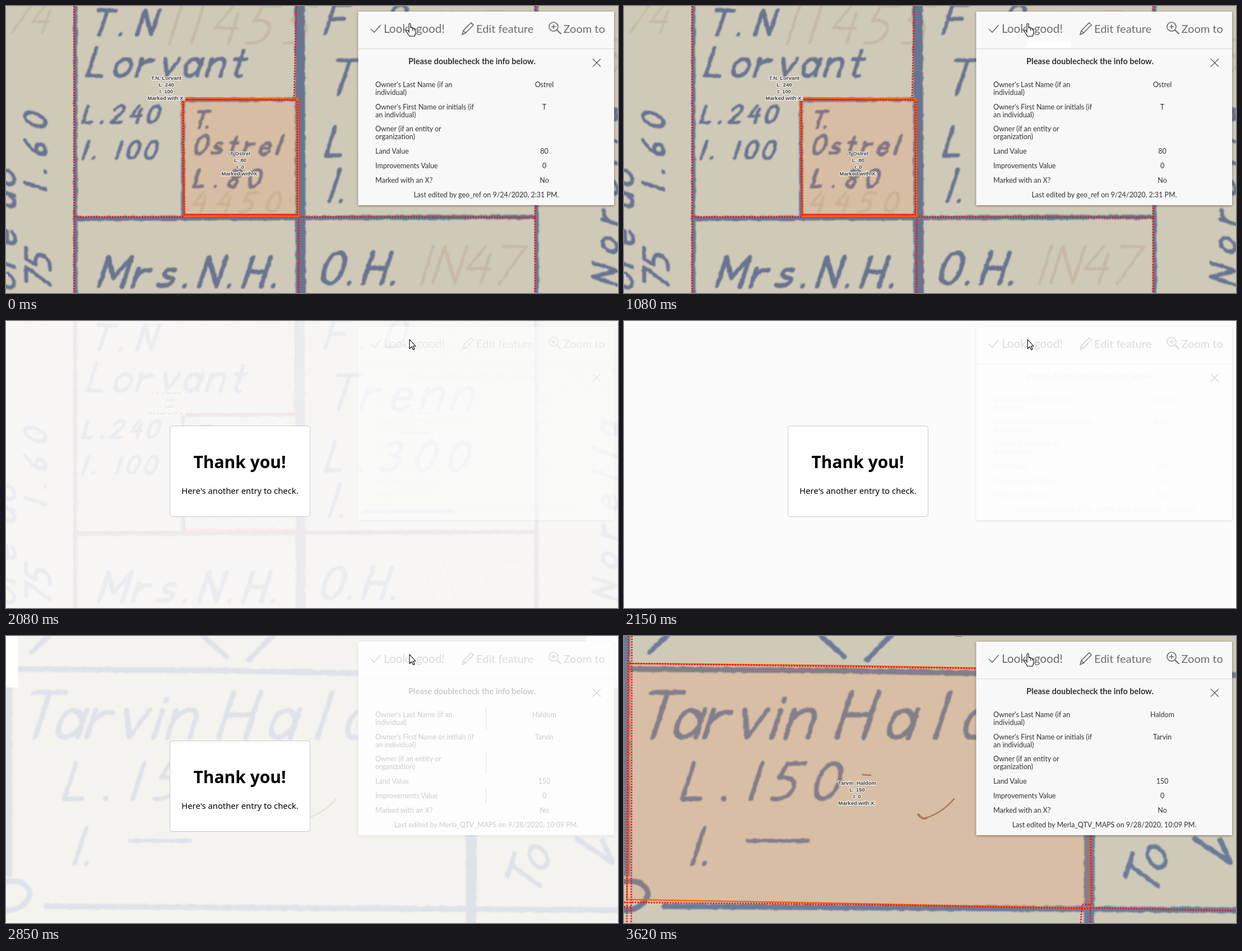
Animation, 1092 px wide and 513 px high, one loop 8 s. Source, as an HTML page:

```html
<!DOCTYPE html>
<html lang="en">
<head>
<meta charset="utf-8">
<title>Parcel check</title>
<style>
  html, body { margin: 0; width: 100%; height: 100%; overflow: hidden; background: #f0f0f0; }
  svg { display: block; width: 100vw; height: 100vh; }
  .pen { fill: none; stroke-linecap: round; stroke-linejoin: round; }
  .ui { font-family: Lato, "Open Sans", sans-serif; font-size: 12.5px; fill: #323232; }
  .act { font-size: 20px; fill: #6e6e6e; }
  .icon { fill: none; stroke: #6a6a6a; stroke-width: 1.6; }
  .mid { text-anchor: middle; }
  .tag { font: bold 9.5px "Liberation Sans", Arial, sans-serif; fill: #444; text-anchor: middle;
         stroke: #f4f2ee; stroke-width: 2.4; stroke-linejoin: round; paint-order: stroke; }
  .dots { fill: none; stroke: #f0141c; stroke-width: 2.8; stroke-dasharray: 2.6 2.2; }
  .dlg { font-family: "Noto Sans", "Open Sans", sans-serif; text-anchor: middle; fill: #000; }
</style>
</head>
<body>
<svg id="stage" viewBox="0 0 1092 513" preserveAspectRatio="none"></svg>
<script>
// Single-stroke handwriting on a 10-unit line: top 0, baseline 10.
const caps = {
  T: 'M0 0H7M3.5 0V10', N: 'M0 10V0L6 10V0', L: 'M0 0V10H5', H: 'M0 0V10M6 0V10M0 5H6',
  F: 'M6 0H0V10M0 5H5', M: 'M0 10V0L4 7 8 0V10', O: 'M3 0C-1 0-1 10 3 10S7 0 3 0',
  2: 'M0 2C1-1 6-1 5 3L0 10H6', 3: 'M0 1C5-2 6 4 2 4.5C7 4 6 12 0 9.5', 4: 'M3 0L0 6H6M5 2V10',
  5: 'M6 0H1L0 4C7 3 6 11 0 10', 6: 'M4 0C-2 5-1 10 2.5 10S5 4 0 6', 7: 'M0 0H6L2 10',
  8: 'M5 1C0-2-1 3 3 5S4 11 2 10-1 7 3 5 6 2 5 1'
};
const bowl = 'M5 7C4 3 0 3 0 7S4 11 5 7';
const small = {
  a: bowl + 'M5 4V10', d: bowl + 'M5 0V10', o: 'M2.5 4C-1 4-1 10 2.5 10S6 4 2.5 4',
  e: 'M0 7H4.5C5 3 0 3 0 7S3 11 5 9', n: 'M0 4V10V7C1 3 5 3 5 6V10', r: 'M0 4V10V7Q1 4 4 4.5',
  v: 'M0 4L2.5 10 5 4', t: 'M2 1V9Q2 10 4 10M0 4H4', l: 'M1 0V10', i: 'M1 4V10M1 1.5v.3',
  s: 'M4 4.5C0 3 0 7 3 7S4 11 0 9.5', '.': 'M.5 9.8v.2'
};
const glyphs = { ...caps, ...small, 0: caps.O, 1: small.l, ' ': '' };
const advance = c => '1il. '.includes(c) ? 3 : c === 'M' ? 9 : small[c] ? 6 : 7;

function write(str, x, y, h, gap, width = 6, rot = 0) {
  let pos = 0;
  const strokes = [...str].map(c => {
    const p = `<path d="${glyphs[c]}" transform="translate(${pos} 0)"/>`;
    pos += advance(c) + gap;
    return p;
  }).join('');
  return `<g stroke-width="${width * 10 / h}" transform="translate(${x} ${y}) rotate(${rot}) skewX(-18) ` +
    `scale(${h / 10}) translate(0 -10)">${strokes}</g>`;
}

const text = (str, x, y, cls = 'ui', more = '') => `<text x="${x}" y="${y}" class="${cls}" ${more}>${str}</text>`;
const line = (d, width, more = '') => `<path d="${d}" stroke-width="${width}" ${more}/>`;
const dots = d => `<path class="dots" d="${d}"/>`;
const rect = (x, y, w, h, more) => `<rect x="${x}" y="${y}" width="${w}" height="${h}" ${more}/>`;
const group = (id, body, more = '') => `<g id="${id}" ${more}>${body}</g>`;
const tag = (x, y, ...rows) => [...rows, 'Marked with X:'].map((r, i) => text(r, x, y + 12 * i, 'tag')).join('');
const paper = rect(0, 0, 1092, 513, 'fill="#cfc9b8"');
const ink = (color, body) => `<g class="pen" stroke="${color}" filter="url(#rough)">${body}</g>`;
const pencil = body => `<g class="pen" stroke="#a98f6c" opacity=".27" filter="url(#rough)">${body}</g>`;
const parcel = d => `<path d="${d}" fill="rgb(255,130,65)" fill-opacity=".16" stroke="#ff6408" stroke-width="2.6"/>`;

const defs = `<defs>
  <filter id="rough" filterUnits="userSpaceOnUse" x="-20" y="-20" width="1140" height="560" color-interpolation-filters="sRGB">
    <feTurbulence type="fractalNoise" baseFrequency=".09" numOctaves="2" seed="4" result="n"/>
    <feDisplacementMap in="SourceGraphic" in2="n" scale="4" xChannelSelector="R" yChannelSelector="G"/>
    <feGaussianBlur stdDeviation=".8"/>
  </filter>
  <filter id="shade" x="-5%" y="-5%" width="110%" height="110%">
    <feDropShadow dx="0" dy="1" stdDeviation="2" flood-opacity=".45"/>
  </filter></defs>`;

const firstMap = paper +
  pencil(write('11455', 285, 66, 66, 3, 5) + write('1N47', 735, 496, 66, 1, 5) + write('4450', 330, 368, 34, 6, 5) +
    write('74', 0, 48, 50, 1, 4) + write('145', 990, 125, 65, 0, 4) + write('1145', 750, 72, 62, 0, 3)) +
  ink('#69748f',
    line('M124 0V513M947 0V513', 7) + line('M524 0L526 513', 18) + line('M123 380L525 379 946 377', 8) +
    line('M316 168L524 167M316 168V377', 7) +
    write('T.N', 152, 51, 43, 4.5, 7) + write('Lorvant', 145, 125, 50, 2.3, 7) +
    write('L.240', 137, 208, 29, 3.8) + write('1. 100', 135, 272, 30, 3.6) +
    write('T.', 335, 217, 28, 1) + write('Ostrel', 335, 264, 32, 2.9) + write('L.80', 335, 323, 30, 5) +
    write('Mrs.N.H.', 166, 501, 52, 2.6, 8) + write('O.H.', 560, 496, 55, 2, 8) +
    write('F.O', 570, 48, 50, 5.5, 7) + write('Trenn', 573, 157, 60, 3, 7) + write('L.300', 571, 267, 50, 4.8, 7) +
    write('1.', 572, 349, 56, 1, 7) + line('M640 340L797 341', 7) +
    write('1.60', 70, 331, 36, 6, 7, -90) + write('ore ao', 15, 506, 44, 3, 7, -90) +
    write('75', 78, 506, 42, 1.5, 7, -90) + write('Norella', 1090, 498, 42, 6.4, 7, -90)) +
  dots('M121.5 0V513M518 0L514 165M522 165V513M944 0V513M122 377H524L946 378M316 167H516M315 168L318 375M319 373H517') +
  tag(733.5, 166.5, 'F.O Trenn', 'L: 300', 'I: 0') + text(':', 1, 485, 'tag') +
  group('pickA', parcel('M314 164L521 166 522 376 318 376 318 300Z') + dots('M318 167L518 168M316 170L318 373H520V170') +
    tag(418, 266.5, 'T Ostrel', 'L: 80', 'I: 0')) +
  tag(286, 131.5, 'T.N. Lorvant', 'L: 240', 'I: 100');

const secondMap = paper +
  ink('#6c7c98',
    line('M0 59L400 62 640 67 1092 70', 10) + line('M5 0V425', 12) + line('M832 80L830 513', 19) +
    line('M72 483L500 486 1092 490', 10) +
    line('M45 29L80 -3M345 -6L393 37M433 43L478 -3', 9) + line('M1018 362L1082 405 1064 365', 9) +
    line('M-6 440C30 430 50 455 40 470S10 495 -6 488', 10) +
    write('Tarvin', 24, 181, 80, 1, 9) + write('Hald', 380, 181, 80, 4, 9) +
    write('L.150', 104, 291, 63, 4.2, 8) + write('1.', 116, 407, 64, .8, 8) + line('M220 366H328', 7) +
    write('To', 946, 466, 60, 1, 8, -72)) +
  `<g class="pen" stroke="#967a62"><path stroke-width="4" d="M525 319Q533 329 540 325"/>
    <path stroke-width="2.5" d="M540 325Q570 314 589 291M426 248L440 249M592 0h10"/></g>`;

const pickB = parcel('M8 49L400 53 830 61 833 487 400 478 5 471Z') +
  dots('M8 0L5 513M14 0L13 513M10 49L628 58 830 62M0 476L420 480 832 487M0 484H14M815 513L817 480H832V513M829 60L834 480M832 486L1092 491') +
  tag(416, 265.5, 'Tarvin &#160;Haldom', 'L: 150', 'I: 0');

const rows = [
  [145, "Owner's Last Name (if an", 'individual)'],
  [185, "Owner's First Name or initials (if", 'an individual)'],
  [224, 'Owner (if an entity or', 'organization)'],
  [264, 'Land Value'], [290, 'Improvements Value'], [315.5, 'Marked with an X?']
];
const entries = [
  ['Ostrel', 'T', '', '80', '0', 'No', 'Last edited by geo_ref on 9/24/2020, 2:31 PM.'],
  ['Haldom', 'Tarvin', '', '150', '0', 'No', 'Last edited by Merla_QTV_MAPS on 9/28/2020, 10:09 PM.']
];
const values = (e, id) => group(id, rows.map(([y], i) => text(e[i], 960.5, y, 'ui mid')).join('') +
  text(e[6], 857, 341.5, 'ui mid'));

const popup = rect(628.5, 10, 456.5, 346, 'fill="#f8f8f8" filter="url(#shade)"') +
  line('M629 76.5H1085', 1, 'stroke="#d8d8d8"') +
  `<g class="icon"><path d="M651 41l6 6 11.5-13"/>
    <path d="M814 51l2-7 14-14 4 4-14 14zM816 44l5 5"/>
    <circle cx="977" cy="37" r="8"/><path d="M973 37h8M977 33v8"/><path stroke-width="2.2" d="M983 43l7.5 7"/>
    <path d="M1047 94.5l14 14M1061 94.5l-14 14"/></g>` +
  text('Looks good!', 674, 47.5, 'ui act', 'style="font-size:20.6px"') +
  text('Edit feature', 839, 47.5, 'ui act') + text('Zoom to', 994.5, 47.5, 'ui act') +
  group('body', text('Please doublecheck the info below.', 831.5, 104, 'ui mid', 'style="font-size:14.5px;font-weight:700"') +
    rows.map(([y, ...parts]) => parts.map((p, i) => text(p, 659, y + 14 * i)).join('')).join('') +
    values(entries[0], 'valuesA') + values(entries[1], 'valuesB')) +
  group('bars', line('M856.5 127V167M856.5 207V247M856.5 272V298', 3, 'stroke="#c8c8c8"'));

const tip = rect(719.5, 54.5, 77, 20, 'fill="#fff" stroke="#888"') +
  text('Looks good!', 758, 68.5, 'dlg', 'style="font-size:11.3px;fill:#555"');
const tipTrace = rect(719, 64, 78, 11, 'fill="#fff"') + rect(719, 54, 78, 10, 'fill="#fff" opacity=".35"');

const dialog = rect(292.5, 187.5, 250, 162, 'rx="4" fill="#fff" stroke="#c8c8c8"') +
  text('Thank you!', 417, 263, 'dlg', 'style="font-size:30px;font-weight:700"') +
  text("Here's another entry to check.", 417.5, 308.5, 'dlg', 'style="font-size:14.8px"');

const pointer = 'fill="#fff" stroke="#000" stroke-width="1.1" stroke-linejoin="round"';
const hand = `<path ${pointer} d="M719 48V33Q719 31 720.5 31T722 33V39Q724 37 725.5 40 728 38 728.5 41 731 40 731 43V48L729 54H720L714 45Q714 42 717 43.5L719 46"/>` +
  line('M725.5 40V44M728.5 41V44', 1, 'stroke="#000"');
const arrow = `<path ${pointer} d="M720 33V49.5L724 46 726.5 51.5 729 50.5 726.5 45H731Z"/>`;

const stage = document.getElementById('stage');
stage.innerHTML = defs + rect(0, 0, 1092, 513, 'fill="#f0f0f0"') + group('mapA', firstMap) + group('mapB', secondMap) +
  group('pickB', pickB) + group('gaps', rect(0, 0, 21, 92, 'fill="#fff"') + rect(1036, 0, 56, 92, 'fill="#fff"')) +
  group('popup', popup) + group('tip', tip) + group('trace', tipTrace) +
  group('veil', rect(0, 0, 1092, 513, 'fill="#fff"')) +
  group('dialog', dialog) + group('hand', hand) + group('arrow', arrow);

const parts = Object.fromEntries([...stage.querySelectorAll('g[id]')].map(g => [g.id, g]));
function show(id, amount) {
  const a = Number(amount);
  parts[id].style.display = a > 0 ? '' : 'none';
  parts[id].style.opacity = a;
}
const within = (t, a, b) => t >= a && t < b;
// Value held from each given time until the next.
const hold = (t, ...steps) => steps.reduce((v, [at, next]) => t >= at ? next : v, 0);

function draw(t) {
  const load = Math.max(0, Math.min(10, Math.floor((t - 2290) / 70) + 1));
  const waiting = within(t, 1610, 3620);
  show('mapA', hold(t, [0, 1], [2080, .5], [2150, 0]));
  show('pickA', t < 1610);
  show('mapB', t >= 2980 ? 1 : load * .095);
  show('pickB', hold(t, [3160, .33], [3230, .66], [3310, 1]));
  show('gaps', within(t, 2500, 2920));
  show('popup', hold(t, [0, 1], [1610, 0], [2080, .5], [2150, 1]));
  show('body', hold(t, [0, 1], [2080, .12], [2290, .12 + load * .1], [2850, 1]));
  show('valuesA', t < 1610);
  show('valuesB', t >= 1610);
  show('bars', within(t, 2290, 3560));
  show('tip', within(t, 560, 1080));
  show('trace', within(t, 1080, 1610));
  show('veil', hold(t, [1610, .75], [3560, .38], [3620, 0]));
  show('dialog', hold(t, [1610, 1], [3560, .5], [3620, 0]));
  show('hand', !waiting);
  show('arrow', waiting);
}

const start = performance.now();
(function tick() {
  draw((performance.now() - start) % 8000);
  requestAnimationFrame(tick);
})();
</script>
</body>
</html>
```
